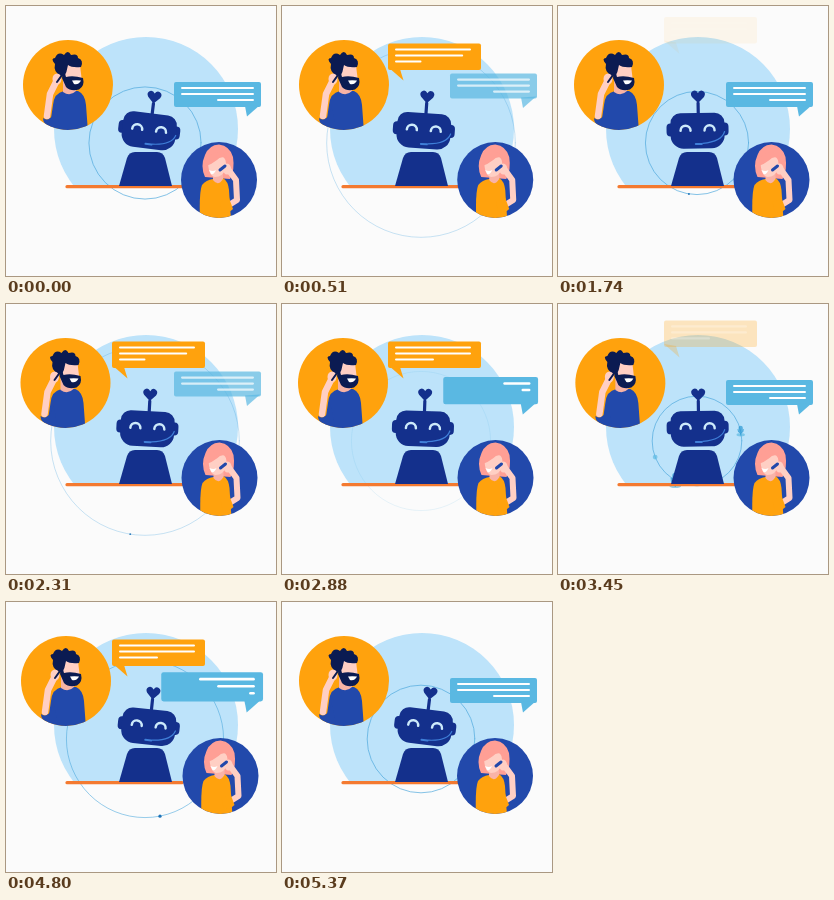
An HTML page with a canvas for the animation above (5.4 s loop, 270 by 270 pixels).

```html
<!DOCTYPE html>
<html lang="en">
<head>
<meta charset="utf-8">
<title>Support robot</title>
<style>
html, body { margin: 0; width: 100%; height: 100%; overflow: hidden; background: #fbfbfb; }
canvas { display: block; width: 270px; height: 270px; }
</style>
</head>
<body>
<canvas id="stage" width="270" height="270"></canvas>
<script>
const ctx = document.getElementById('stage').getContext('2d');
const TAU = Math.PI * 2, LOOP = 5400;
const NAVY = '#14308c', INK = '#0b1b52', ORANGE = '#ffa20d', SKY = '#5ab8e2', ROYAL = '#2249ab';
const SKIN = '#ffcfc4', ROSE = '#ff9f95';
const clamp = (v, lo = 0, hi = 1) => Math.min(hi, Math.max(lo, v));
const mod = (a, n) => ((a % n) + n) % n;

// Smooth interpolation through [time, value] pairs
function keys(t, list) {
  if (t <= list[0][0]) return list[0][1];
  for (let i = 1; i < list.length; i++) {
    const [a, u] = list[i - 1], [b, v] = list[i];
    if (t < b) return u + (v - u) * (1 - Math.cos(Math.PI * (t - a) / (b - a))) / 2;
  }
  return list[list.length - 1][1];
}

function layer(draw, alpha = 1) {
  ctx.save();
  ctx.globalAlpha *= alpha;
  draw();
  ctx.restore();
}
function fill(d, color) {
  ctx.fillStyle = color;
  ctx.fill(new Path2D(d));
}
function stroke(d, color, width) {
  ctx.strokeStyle = color;
  ctx.lineWidth = width;
  ctx.lineCap = ctx.lineJoin = 'round';
  ctx.stroke(new Path2D(d));
}
function oval(x, y, rx, ry, color) {
  ctx.beginPath();
  ctx.ellipse(x, y, rx, ry, 0, 0, TAU);
  ctx.fillStyle = color;
  ctx.fill();
}
function box(x, y, w, h, r, color) {
  ctx.beginPath();
  ctx.roundRect(x, y, w, h, r);
  ctx.fillStyle = color;
  ctx.fill();
}
function disc(x, y, r, color, draw) {
  layer(() => {
    ctx.translate(x, y);
    oval(0, 0, r, r, color);
    ctx.clip();
    draw();
  });
}

function backdrop() {
  ctx.fillStyle = '#fbfbfb';
  ctx.fillRect(0, 0, 270, 270);
  layer(() => {
    ctx.beginPath();
    ctx.rect(0, 0, 270, 181);
    ctx.clip();
    oval(140, 123, 92, 92, '#bde3fa');
  });
}

const icons = {
  dot: () => oval(0, 0, 2.4, 2.4, SKY),
  pin: () => oval(0, 0, 1.6, 1.6, '#1d73b8'),
  chat: () => fill('M-6 -4.5H6V3H5L4 6L1 3H-6Z', SKY),
  mic: () => {
    oval(0, 5.5, 6, 2.4, SKY);
    stroke('M-4 -2Q-4 3 0 3Q4 3 4 -2M0 3V6', '#1f93d1', 1.4);
    box(-3, -7.5, 6, 10, 3, '#1f93d1');
  }
};
// [icon, angle in degrees, size] carried by each of the six rings
const riders = [
  [],
  [['chat', 92, 1]],
  [['pin', 99, .6]],
  [],
  [['mic', -13, .7], ['mic', 119, 1], ['dot', 159, 1]],
  [['pin', 79, 1]]
];

// A ring leaves every 900 ms; every second one shows up later
function rings(t) {
  const now = Math.floor(t / 900);
  for (let k = now; k <= now + 1; k++) {
    const r = 56 + .075 * (t - k * 900);
    if (r < 35 || r >= 112) continue;
    const shown = clamp((r - (k % 2 ? 68 : 35)) / 9);
    layer(() => {
      ctx.beginPath();
      ctx.arc(139, 137, r, 0, TAU);
      ctx.strokeStyle = '#4aa6dc';
      ctx.lineWidth = .8;
      ctx.stroke();
    }, .85 * shown * clamp((112 - r) / 40));
    for (const [name, angle, size] of riders[k % 6]) {
      layer(() => {
        const a = angle * TAU / 360;
        ctx.translate(139 + r * Math.cos(a), 137 + r * Math.sin(a));
        ctx.scale(size, size);
        icons[name]();
      }, clamp((112 - r) / 20) * clamp((r - 35) / 15));
    }
  }
}

function robot(t) {
  const tilt = keys(t, [[0, 7], [1080, .5], [1740, -1], [2300, 3], [2880, 2],
    [4020, -3.5], [4800, 6], [5370, 7], [LOOP, 7]]);
  fill('M113 180L121 152Q123 146 129 146H151Q157 146 159 152L166 180Z', NAVY);
  layer(() => {
    ctx.translate(140, 150);
    ctx.rotate(tilt * TAU / 360);
    ctx.translate(-140, -150);
    stroke('M141 97V109', NAVY, 3.2);
    fill('M141 97L135 91Q132.5 87 136 85Q139 83.5 141 87Q143 83.5 146 85Q149.5 87 147 91Z', NAVY);
    box(109, 117, 10, 13, 4, NAVY);
    box(161, 117, 10, 13, 4, NAVY);
    box(113, 107, 54, 35.5, [10, 10, 13, 13], NAVY);
    for (const x of [128, 152]) stroke(`M${x - 5} 124.5A5 5 0 0 1 ${x + 5} 124.5`, '#cdeafb', 2.5);
    stroke('M167 126Q164 136 145 137.5', '#3f7fd8', 1.2);
    stroke('M138 138H144', '#3f7fd8', 2);
  });
}

function man(x) {
  disc(x, 79, 45, ORANGE, () => {
    ctx.translate(-62, -79);
    fill('M43 126L47 99Q48 87 58 85L72 85Q79 88 80 99L82 126Z', ROYAL);
    fill('M57 70H70V85Q64 91 57 86Z', '#f7b3a5');
    fill('M57 58Q66 53 74 59L76 76Q70 83 60 79Z', SKIN);
    fill('M58 64L60 71Q67 69 77 72Q79 80 73 83.5Q65 86 60 81L56 72Z', INK);
    fill('M66 74.5Q70 74 75 74.5Q73 79 68 78Z', '#fff');
    fill('M55 70Q47 66 49 58Q44 52 49 52Q52 45 58 49Q62 43 65 49Q72 47 72 52Q78 54 75 61Q66 62 62 59Q61 66 58 71Z', INK);
    stroke('M41 110L44 88L51 74', SKIN, 6.5);
    fill('M37 112Q42 116 47 109L50 100L54 122L43 120Q37 118 37 112Z', ROYAL);
    oval(51, 73, 4.5, 5.5, SKIN);
    stroke('M51 76L56 69', INK, 2);
  });
}

function woman(x) {
  disc(x, 174, 38, ROYAL, () => {
    ctx.translate(-213, -174);
    fill('M199 171Q194 160 199 149Q203 139 213 138.5Q224 140 227 151Q229 164 224 173Z', ROSE);
    fill('M194 214Q193 186 196 179Q200 174 207 173L217 172Q222 175 223 184L225 214Z', ORANGE);
    fill('M207 165H217V173Q212 181 207 174Z', '#f9b3a8');
    fill('M202 154Q210 154 215 149Q221 152 220 162Q217 171 209 171Q202 170 202 154Z', SKIN);
    fill('M203 164Q207 166 210 164Q208 169 205 168Z', '#fff');
    fill('M200 160Q200 147 212 146Q218 145 222 153Q215 149 211 154Q206 158 200 160Z', ROSE);
    stroke('M223 199L231 194L230 174L222 163', SKIN, 6);
    fill('M214 196L223 192L227 203Q222 208 216 206Z', ORANGE);
    oval(221, 163, 4, 5.5, SKIN);
    stroke('M214 164L219 160', ROYAL, 3);
  });
}

// Pops from the tail tip, types three lines, then floats up and fades
function bubble(age, life, color, tip, body, tail, lines, dir) {
  if (age < 0) return;
  const scale = keys(age, [[0, 0], [150, 1.09], [210, 1.2], [270, 1.17], [360, 1.03], [410, 1]]);
  const out = Math.max(0, age - life);
  const alpha = 1 - clamp(out / 470);
  if (!alpha || !scale) return;
  layer(() => {
    ctx.translate(tip[0], tip[1] - out * .06);
    ctx.scale(scale, scale);
    ctx.translate(-tip[0], -tip[1]);
    box(...body, 2, color);
    fill(tail, color);
    const pace = [[20, .19], [110, .2], [230, .12]];
    lines.forEach(([x, y, full], i) => {
      const w = clamp((age - pace[i][0]) * pace[i][1], 0, full);
      if (w) box(dir > 0 ? x : x - w, y - 1.1, w, 2.2, 1.1, '#fff');
    });
  }, alpha);
}

function draw(t) {
  const beat = mod(t, 1800);
  backdrop();
  rings(t);
  stroke('M61 180.7H176', '#f47a30', 3.2);
  robot(t);
  man(keys(t, [[0, 62], [1080, 62], [1740, 61], [2300, 59.5], [2880, 61], [3600, 62.5],
    [4020, 63], [4800, 60], [5370, 62], [LOOP, 62]]));
  bubble(beat - 60, 1240, ORANGE, [121, 74.5], [106, 37.5, 93, 26.5],
    'M106 61L121.5 74.5L118 63Z', [[113, 43.5, 76], [113, 49.5, 76], [113, 55.5, 39]], 1);
  bubble(mod(beat - 930, 1800), 1240, SKY, [243, 110.5], [168, 76, 87, 25],
    'M239 100L241 110.5L254 99Z', [[248, 82, 73], [248, 88, 73], [248, 94, 37]], -1);
  woman(keys(t, [[0, 213], [1080, 213.5], [2880, 213.5], [4020, 213.5], [4800, 214.5], [5370, 213], [LOOP, 213]]));
}

const start = performance.now();
function tick() {
  draw((performance.now() - start) % LOOP);
  requestAnimationFrame(tick);
}
tick();
</script>
</body>
</html>
```
